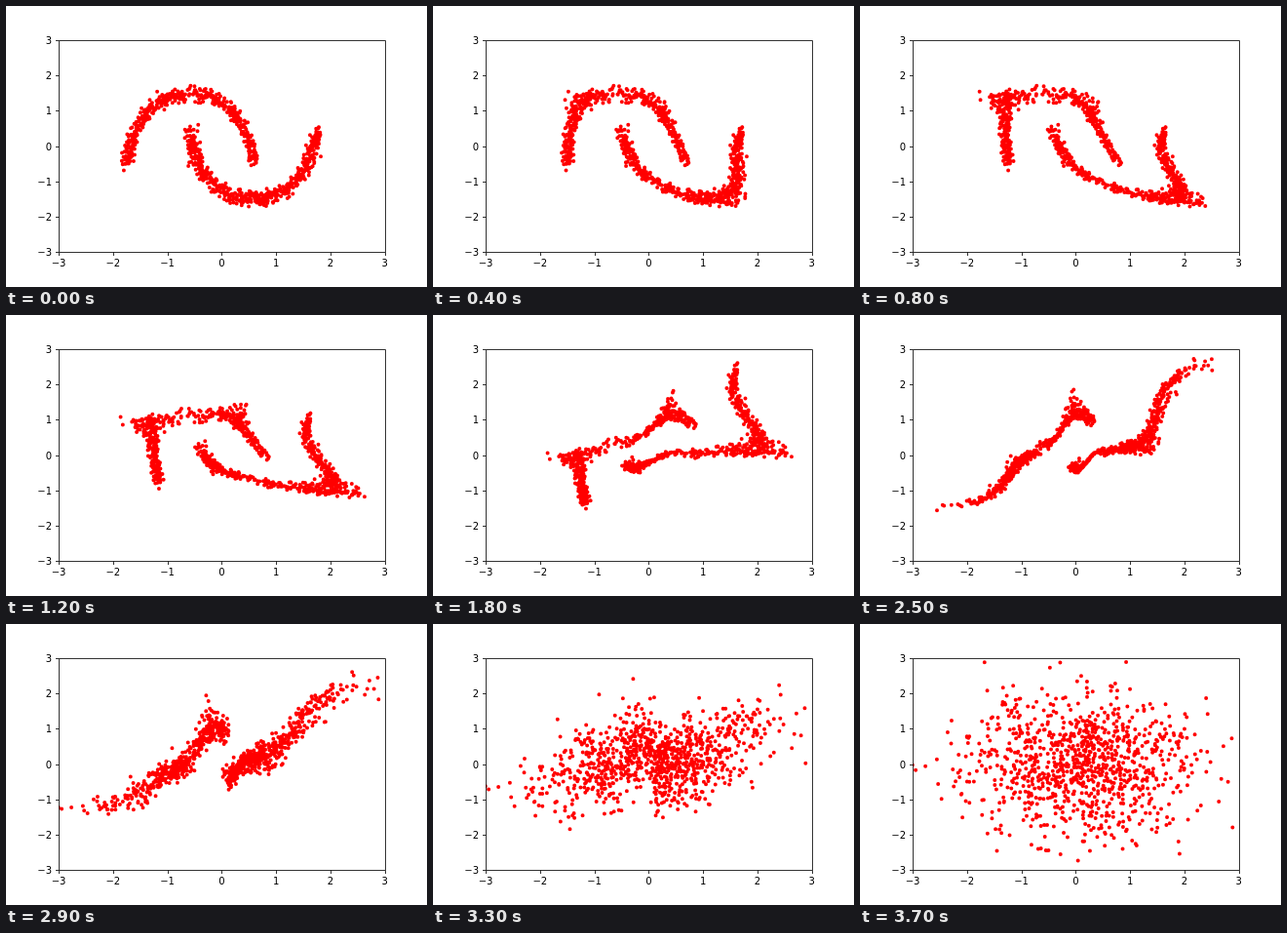
An HTML page with a canvas for the animation above (3.8 s loop, 432 px wide and 288 px high).

```html
<!DOCTYPE html>
<html lang="en">
<head>
<meta charset="utf-8">
<title>Two moons flowing into a Gaussian</title>
<style>
  html, body { margin: 0; width: 432px; height: 288px; overflow: hidden; background: #fff; }
  canvas, svg { position: absolute; left: 0; top: 0; width: 432px; height: 288px; }
  text { font: 10px "DejaVu Sans", sans-serif; fill: #000; }
  path { fill: none; stroke: #000; stroke-width: .8; }
</style>
</head>
<body>
<canvas id="dots"></canvas>
<svg id="axes" viewBox="0 0 432 288"></svg>
<script>
const STEP = 100, STEPS = 38, LAYER = 9.25, COUNT = 1000;
const BOX = { x: 54, y: 35, w: 334.8, h: 217.44 };
const px = x => BOX.x + (x + 3) * BOX.w / 6;
const py = y => BOX.y + (3 - y) * BOX.h / 6;

// Axes, snapped to whole pixels
function drawAxes() {
  const snap = v => Math.round(v) + .5;
  const [l, r, t, b] = [snap(px(-3)), snap(px(3)), snap(py(3)), snap(py(-3))];
  let d = `M${l} ${t}H${r}V${b}H${l}Z`, labels = '';
  for (let v = -3; v <= 3; v++) {
    const name = (v < 0 ? '\u2212' : '') + Math.abs(v);
    d += `M${snap(px(v))} ${b}v3.5M${l} ${snap(py(v))}h-3.5`;
    labels += `<text x="${px(v)}" y="267" text-anchor="middle">${name}</text>` +
              `<text x="47" y="${Math.round(py(v) + 4)}" text-anchor="end">${name}</text>`;
  }
  document.getElementById('axes').innerHTML = `<path d="${d}"/>${labels}`;
}

// Seeded normal noise
let seed = 20;
function rand() {
  seed = (seed + 0x6D2B79F5) | 0;
  let n = Math.imul(seed ^ (seed >>> 15), 1 | seed);
  n = (n + Math.imul(n ^ (n >>> 7), 61 | n)) ^ n;
  return ((n ^ (n >>> 14)) >>> 0) / 4294967296;
}
const normal = () => Math.sqrt(-2 * Math.log(1 - rand())) * Math.cos(2 * Math.PI * rand());
const { exp, tanh, cos, sin, PI } = Math;
const logistic = v => 1 / (1 + exp(-v));
const normalCdf = z => logistic(1.5976 * z + .07056 * z ** 3);

// Coupling layers: each shifts one coordinate by an affine rule set by the other
const bendX = (x, y) =>
  x + .17 * exp(-1.4 * y) - .18 * exp(-y * y) * x + logistic(8 * (y - 1.25)) * (.95 * x + .35);
const bendY = (x, y) =>
  y + .5 + 1.7 * tanh(1.1 * (x - .25)) + y * (.26 * tanh(3 * (x - .6)) - .3 * exp(-5 * x * x));

// The normal rank of a point sets its place along the two moons, laid end to end
function makePoint() {
  const z = normal(), nx = normal(), ny = normal();
  const along = 2 * normalCdf(z), side = along < 1 ? 1 : -1;
  const a = PI * (along % 1);
  const x0 = (-cos(a) - side * .5) / .87 + .058 * nx;
  const y0 = side * (sin(a) - .25) / .5 + .1 * ny;
  const x1 = bendX(x0, y0);
  const y1 = bendY(x1, y0);
  return { x0, y0, x1, y1, x2: z + .08 + .05 * nx, y2: ny };
}

const points = Array.from({ length: COUNT }, makePoint);
const canvas = document.getElementById('dots');
const ctx = canvas.getContext('2d');
const ratio = window.devicePixelRatio || 1;
canvas.width = 432 * ratio;
canvas.height = 288 * ratio;
ctx.scale(ratio, ratio);
ctx.beginPath();
ctx.rect(BOX.x, BOX.y, BOX.w, BOX.h);
ctx.clip();
ctx.fillStyle = '#f00';

function draw(step) {
  const part = k => Math.min(Math.max(step / LAYER - k, 0), 1);
  const [a, b, c, d] = [0, 1, 2, 3].map(part);
  ctx.clearRect(0, 0, 432, 288);
  ctx.beginPath();
  for (const p of points) {
    const x = px(p.x0 + (p.x1 - p.x0) * a + (p.x2 - p.x1) * c);
    const y = py(p.y0 + (p.y1 - p.y0) * b + (p.y2 - p.y1) * d);
    ctx.moveTo(x + 2, y);
    ctx.arc(x, y, 2, 0, 2 * PI);
  }
  ctx.fill();
}

const start = performance.now();
function tick() {
  draw(Math.floor((performance.now() - start) / STEP) % STEPS);
  requestAnimationFrame(tick);
}
drawAxes();
tick();
</script>
</body>
</html>
```
